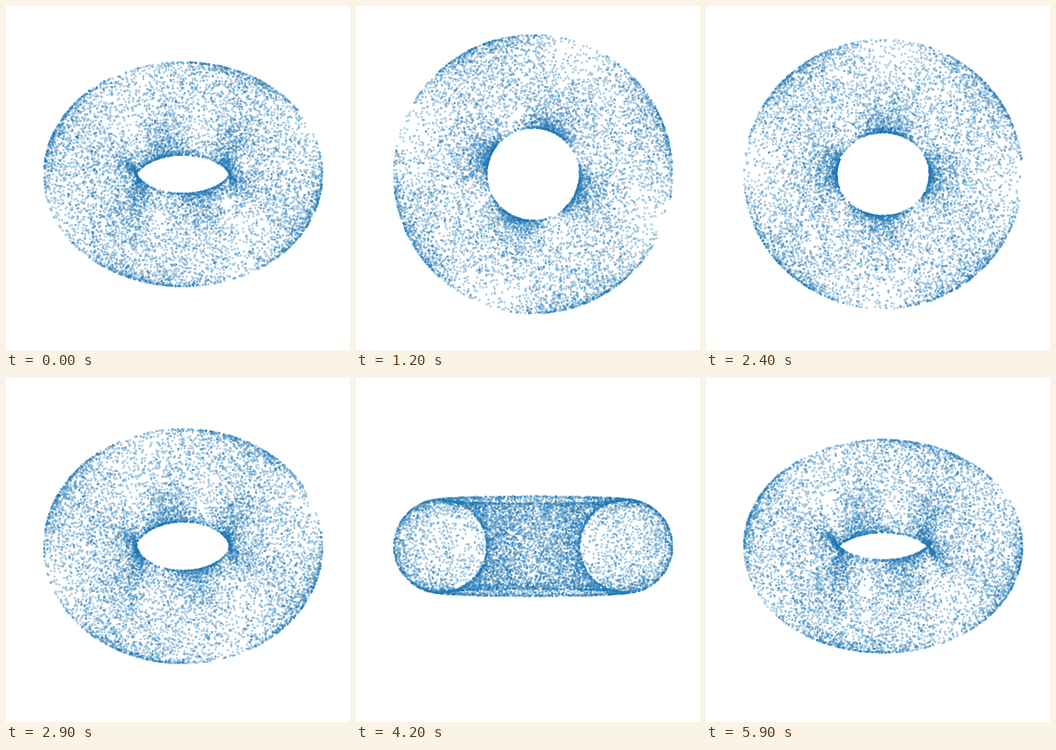
Animation of 500 by 500 pixels, one loop 6000 ms. Source, as a matplotlib script:

```python
import numpy as np
import matplotlib.pyplot as plt
from matplotlib.animation import FuncAnimation

SIZE, DPI = 500, 100
FRAMES, INTERVAL = 60, 100
POINTS = 10000
CONTRAST = 0.9
RING, TUBE = 2.0, 1.0
SCALE = 67.5
CENTER_X, CENTER_Y = 257, 244


def sample_torus(count, seed=4):
    """Random torus points, clustered four times around the ring."""
    rng = np.random.default_rng(seed)
    u, v = rng.uniform(0, 2 * np.pi, (2, 3 * count))
    weight = (1 + CONTRAST * np.sin(4 * u) * np.cos(v)) / 2
    keep = rng.random(u.size) < weight
    u, v = u[keep][:count], v[keep][:count]
    rho = RING + TUBE * np.cos(v)
    return rho * np.cos(u), rho * np.sin(u), TUBE * np.sin(v)


def project(x, y, z, elev, azim):
    """Orthographic view, returned in stage pixels."""
    right = y * np.cos(azim) - x * np.sin(azim)
    toward = x * np.cos(azim) + y * np.sin(azim)
    up = z * np.cos(elev) - toward * np.sin(elev)
    return CENTER_X + SCALE * right, CENTER_Y - SCALE * up


fig = plt.figure(figsize=(SIZE / DPI, SIZE / DPI), dpi=DPI, facecolor="white")
ax = fig.add_axes([0, 0, 1, 1])
ax.set(xlim=(0, SIZE), ylim=(SIZE, 0))
ax.axis("off")

torus = sample_torus(POINTS)
dots, = ax.plot([], [], "o", ms=1.45, mfc="none", mec="#1f77b4", mew=0.34)


def update(i):
    # Elevation and azimuth swing together between 0 and 90 degrees.
    angle = np.pi / 4 * (1 + np.sin(2 * np.pi * i / FRAMES))
    dots.set_data(*project(*torus, angle, angle))
    return dots,


anim = FuncAnimation(fig, update, frames=FRAMES, interval=INTERVAL,
                     repeat=True, repeat_delay=0)
plt.show()
```
